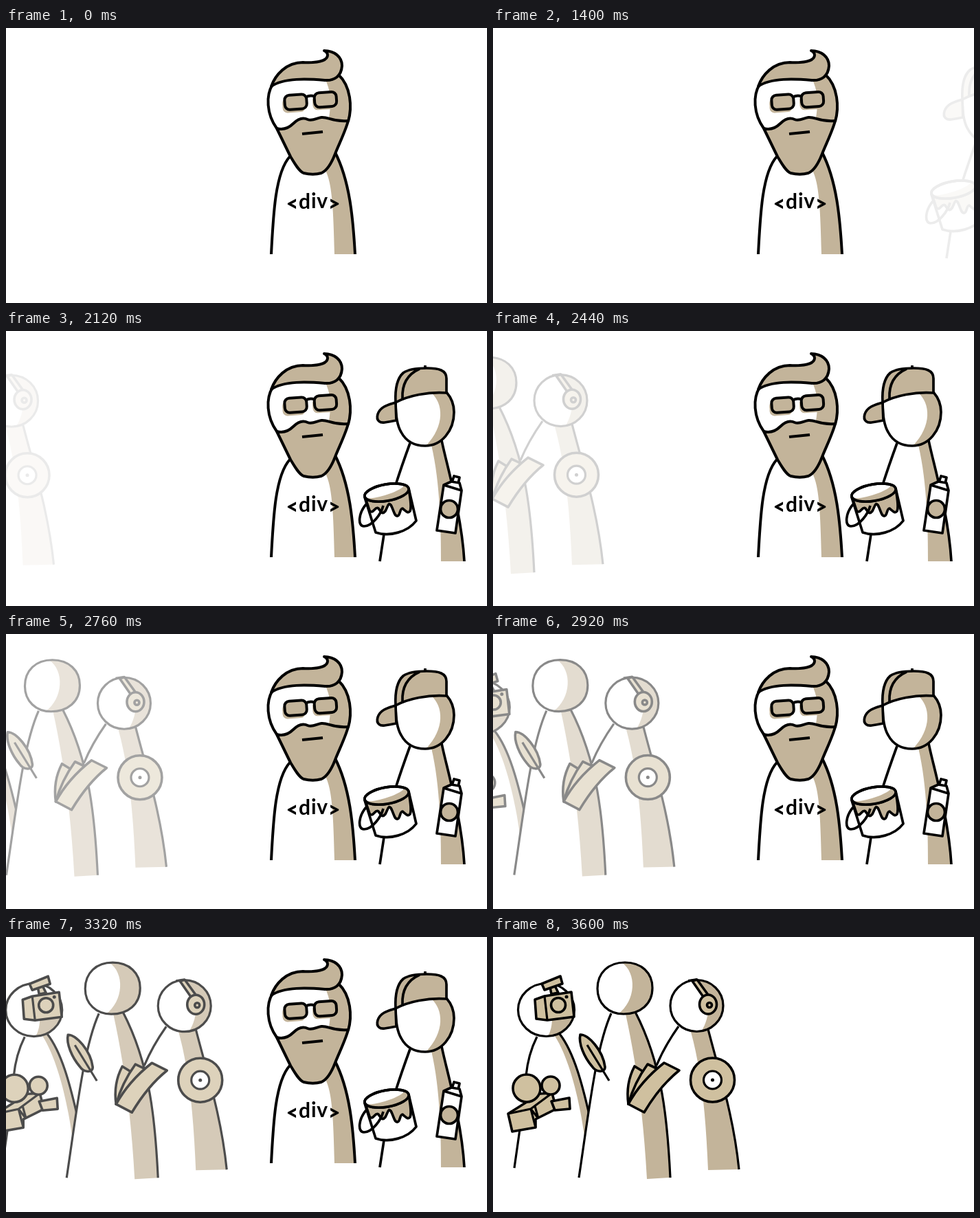
Animation, 700 px wide and 400 px high, one loop 3.64 s. Source, as an HTML page:

```html
<!DOCTYPE html>
<html lang="en">
<head>
<meta charset="utf-8">
<title>Crew</title>
<style>
  html, body { margin: 0; width: 100%; height: 100%; overflow: hidden; background: #fff; }
  svg { display: block; width: 700px; height: 400px; }
  .line { fill: none; }
  .white { fill: #fff; }
  .shade { fill: #c3b49a; }
  .tone { fill: #c3b49a; stroke: none; }
  .blank { fill: #fff; stroke: none; }
  .prop { fill: #cfc09f; stroke-width: 3.6px; }
  .dot { fill: #000; stroke: none; }
  text { font: 700 30px Lato, "Open Sans", sans-serif; letter-spacing: .8px; stroke: none; fill: #000; }
  .angle { font-weight: 900; }
</style>
</head>
<body>
<svg viewBox="0 0 700 400" stroke="#000" stroke-width="3.2" stroke-linejoin="round">

  <g id="coder" stroke-width="4">
    <path class="tone" d="M464 205C474 225 476 250 478 329H508C505 275 500 222 479 181Z"/>
    <path class="line" d="M386 329C389 270 392 210 413 187M479 181C500 222 505 275 508 329"/>
    <path class="blank" d="M388 82C378 98 379 125 394 146L440 150L498 136C504 115 502 85 484 68Z"/>
    <path class="tone" d="M464 74C473 90 474 112 469 136H498C504 115 502 85 484 68Z"/>
    <path class="shade" d="M394 146C405 149 412 145 418 139C426 131 433 130 439 133C446 136 452 131 459 130C470 129 474 137 498 135C494 150 485 168 479 183C474 196 468 207 459 211C452 213 441 213 433 211C426 208 420 197 414 187Z"/>
    <path class="line" d="M388 82C378 98 379 125 394 146M498 136C504 115 502 85 484 68"/>
    <path class="shade" d="M386 85C392 68 408 50 432 50C452 51 467 48 468 40C468 36 466 34 463 33C478 33 489 42 489 55C488 70 478 77 464 76C440 74 404 72 386 85Z"/>
    <path class="line" d="M431 154L461 151"/>
    <g transform="rotate(-4 444 106)">
      <rect class="tone" x="402" y="100" width="33" height="21" rx="7"/>
      <rect class="tone" x="446" y="99" width="33" height="21" rx="7"/>
      <rect class="shade" x="405.500" y="95.500" width="32" height="21" rx="7"/>
      <rect class="shade" x="449" y="95" width="32" height="21" rx="7"/>
      <path class="line" d="M437 100Q443 97 450 100"/>
    </g>
    <text x="447.5" y="263" text-anchor="middle"><tspan class="angle" dy="3">&lt;</tspan><tspan dy="-3">d</tspan><tspan dy="-1.5">iv</tspan><tspan class="angle" dy="4.500">&gt;</tspan></text>
  </g>

  <g id="painter" stroke-width="3.7">
    <path class="tone" d="M619 166L634 159C640 190 663 265 667 335H633C633 290 632 220 619 166Z"/>
    <path class="line" d="M588 163C580 185 573 205 567 224M550 296L544 335M634 159C640 190 663 265 667 335"/>
    <path class="blank" d="M567 104C567 120 569 137 575 147C583 162 597 167 610 167C634 167 652 145 652 118C652 106 648 97 641 89Z"/>
    <path class="tone" d="M618 89C637 105 639 138 611 167C634 167 652 145 652 118C652 106 648 97 641 89Z"/>
    <path class="line" d="M567 104C567 120 569 137 575 147C583 162 597 167 610 167C634 167 652 145 652 118C652 106 648 97 641 89"/>
    <path class="shade" d="M567 104C558 107 545 109 541 121C538 131 545 134 551 133C558 132 563 131 568 130Z"/>
    <path class="shade" d="M567 104C566 85 568 70 578 61C585 56 600 54 612 54C630 54 641 57 641 69V90C615 88 585 94 567 104Z"/>
    <path class="line" d="M577 98C576 78 584 63 602 55M610 50V55"/>
    <path class="white" d="M522 242L538 293C558 300 585 292 597 276L586 229Z"/>
    <path class="shade" d="M523 243L529 261C534 268 537 254 542 258C546 264 548 267 552 262C556 255 556 249 560 253C565 262 565 270 570 269C574 268 573 258 577 258C582 262 585 266 588 262C591 255 588 243 586 229Z"/>
    <ellipse class="white" cx="554" cy="235" rx="32.5" ry="12" transform="rotate(-10 554 235)"/>
    <path class="tone" d="M524 243C536 245 568 236 580 225C588 226 587 233 578 238C562 247 536 251 524 243Z"/>
    <ellipse class="line" cx="554" cy="235" rx="32.5" ry="12" transform="rotate(-10 554 235)"/>
    <path class="line" d="M525 251C513 264 511 284 521 284C533 284 546 266 549 254"/>
    <path class="white" d="M649 220L652 211L660 213L658 222Z"/>
    <path class="white" d="M637 224L648 219L660 221L663 232L654 294L627 290Z"/>
    <path class="line" d="M637 224L663 232"/>
    <circle class="shade" cx="645" cy="259" r="12.5"/>
  </g>

  <g id="crew">
    <g>
      <path class="tone" d="M288 138L313 134C330 200 350 260 358 338L313 339C310 270 305 200 288 138Z"/>
      <path class="line" d="M270 130C258 147 245 170 238 187M313 134C330 200 350 260 358 338"/>
      <ellipse class="blank" cx="296.500" cy="100" rx="38.500" ry="37.500"/>
      <path class="tone" d="M296 62.500C319 82 317 116 303 137.500C323 134 335 118 335 100C335 79 318 62.500 296 62.500Z"/>
      <ellipse class="line" cx="296.500" cy="100" rx="38.500" ry="37.500"/>
      <path class="line" d="M284 63.500L297 61.500"/>
      <path class="prop" d="M290 64L297 62L313 84L306 87Z"/>
      <ellipse class="prop" cx="313" cy="98" rx="12.500" ry="14"/>
      <circle class="prop" cx="315" cy="99" r="3.500"/>
      <circle class="prop" cx="319.5" cy="208" r="32"/>
      <circle class="white" cx="319.5" cy="208" r="13"/>
      <circle class="dot" cx="319.5" cy="208" r="2.5"/>
    </g>

    <g>
      <path class="tone" d="M90 144L97 141C118 168 130 215 140 258L133 290C127 245 113 180 90 144Z"/>
      <path class="line" d="M64 145C54 165 50 182 48 202M39 280L31 336M97 141C118 168 130 215 140 258"/>
      <ellipse class="blank" cx="77.500" cy="106" rx="41" ry="38.5"/>
      <path class="tone" d="M86 118C86 128 84 137 80 144C102 143 118 127 118.500 105Z"/>
      <ellipse class="line" cx="77.500" cy="106" rx="41" ry="38.5"/>
      <path class="prop" d="M83 73L85 83L95 81L90 71Z"/>
      <path class="prop" d="M71 68L98 57L101 68L75 77Z"/>
      <path class="prop" d="M61 91L75 86L114 80L118 116L79 121L63 119Z"/>
      <path class="line" d="M75 86L79 121"/>
      <circle class="prop" cx="95" cy="99" r="10.500"/>
      <circle class="dot" cx="107" cy="87" r="2.5"/>
      <path class="prop" d="M22 257L38 247L68 228L86 227L92 250L62 265L62 277L28 283Z"/>
      <path class="line" d="M22 257L55 250L62 277M55 250L86 227M55 250L66 264M61 246L66 264"/>
      <circle class="prop" cx="49" cy="220" r="20"/>
      <circle class="prop" cx="84" cy="216" r="13"/>
      <path class="prop" d="M85 239L111 234L112 250L90 252Z"/>
    </g>

    <g>
      <path class="blank" d="M172 111C150 160 140 250 125 350H224L207 109Z"/>
      <path class="tone" d="M193 112L207 109C247 186 254 268 258 350L224 352C219 260 208 180 193 112Z"/>
      <path class="line" d="M172 111C150 160 140 250 125 350M207 109C247 186 254 268 258 350"/>
      <path class="blank" d="M192 37C216 37 232 52 232 74C232 98 214 112 190 112C168 112 152 97 152 75C152 52 168 37 192 37Z"/>
      <path class="tone" d="M187 37C210 52 208 93 182 112H190C214 112 232 98 232 74C232 52 216 37 192 37Z"/>
      <path class="line" d="M192 37C216 37 232 52 232 74C232 98 214 112 190 112C168 112 152 97 152 75C152 52 168 37 192 37Z"/>
      <path class="prop" d="M127 142C139 142 160 165 163 189C163 198 150 197 144 188C133 175 124 155 127 142Z"/>
      <path class="line" d="M137 157L169 209"/>
      <path class="prop" d="M197 243C194 222 197 205 206 188L219 196L210 228Z"/>
      <path class="prop" d="M197 243C203 221 212 203 225 185L242 193L215 230Z"/>
      <path class="prop" d="M197 243C211 217 230 198 249 183L271 194C251 210 235 230 220 255Z"/>
    </g>
  </g>
</svg>

<script>
  const LOOP = 3640, STEP = 40;
  const PAINTER_IN = 1400, CREW_IN = 1960, SOLO = 3600;
  const [coder, painter, crew] = ["coder", "painter", "crew"].map(id => document.getElementById(id));

  const fade = [[1960, 0.03], [2440, 0.18], [2760, 0.36], [3080, 0.56], [3600, 0.86]];

  function lerp(points, t) {
    const i = Math.max(1, points.findIndex(p => p[0] >= t));
    const [[t0, a], [t1, b]] = [points[i - 1], points[i]];
    return a + (b - a) * (t - t0) / (t1 - t0);
  }

  function place(el, opacity, x = 0, y = 0) {
    el.setAttribute("opacity", opacity);
    el.setAttribute("transform", `translate(${x} ${y})`);
  }

  function draw(time) {
    const t = Math.floor(time % LOOP / STEP) * STEP;
    const solo = t >= SOLO;
    place(coder, solo ? 0 : 1);

    if (t < PAINTER_IN || solo) place(painter, 0);
    else if (t >= CREW_IN) place(painter, 1);
    else {
      const s = t - PAINTER_IN;
      place(painter, 0.07 + s * 0.00057, (10.77 - s * 0.01866) ** 2);
    }

    if (t < CREW_IN) place(crew, 0);
    else if (solo) place(crew, 1);
    else {
      // quadratic ease-out, cut off by the last step
      const gap = (18.44 - (t - CREW_IN) * 0.0091) ** 2;
      place(crew, lerp(fade, t), -gap, gap * 0.006);
    }
  }

  const start = performance.now();
  function tick() {
    draw(performance.now() - start);
    requestAnimationFrame(tick);
  }
  tick();
</script>
</body>
</html>
```
